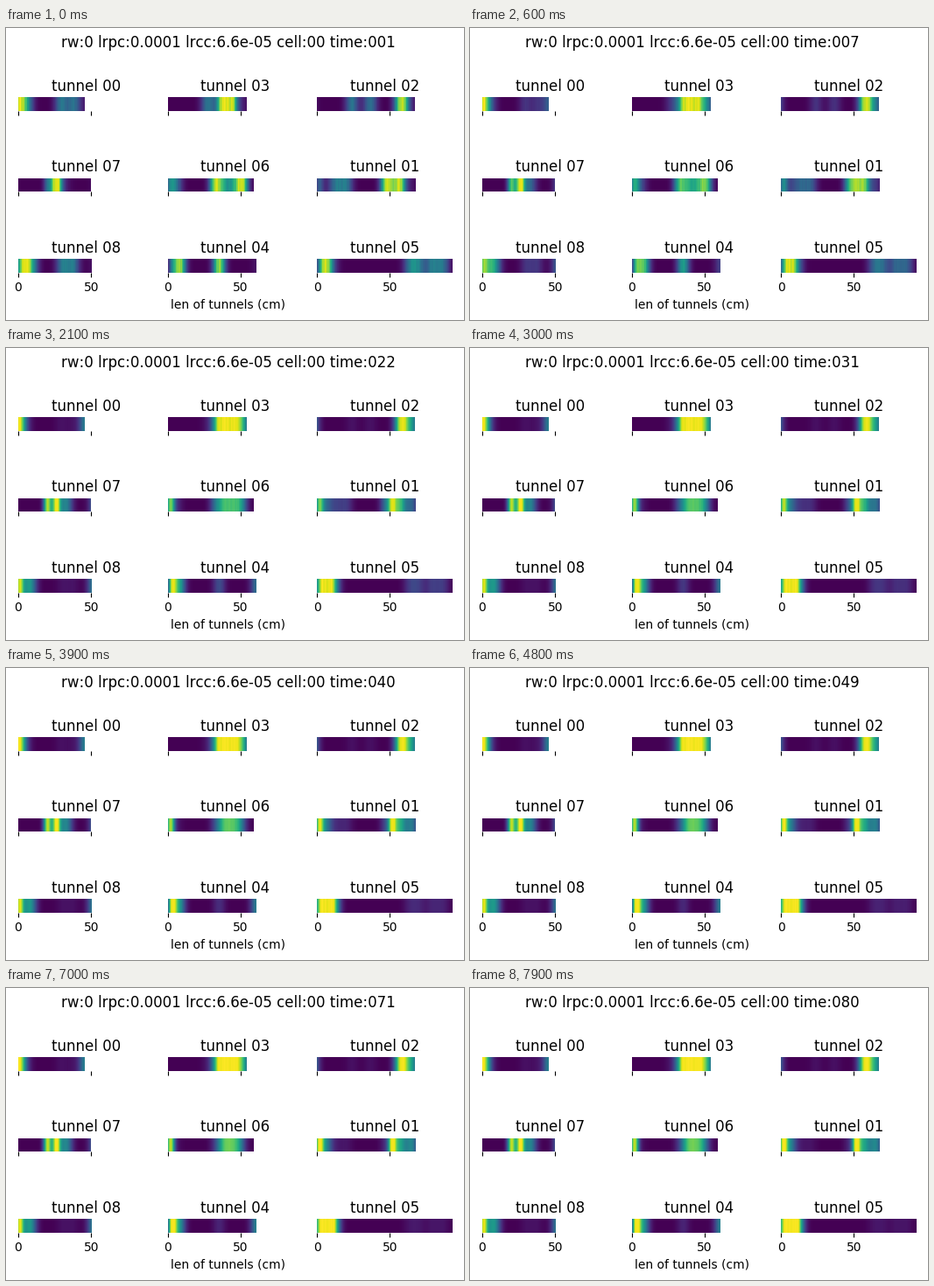
A matplotlib script that plays this animation: 523x334 px, repeating every 8 s.

```python
import numpy as np
import matplotlib.pyplot as plt
from matplotlib.animation import FuncAnimation

W, H, DPI = 523, 334, 100
FRAMES, STEP_MS = 80, 100
LEFT, PITCH_X, AX_W = 14.0, 170.5, 155.0
BOTTOM, PITCH_Y, AX_H = 94.9, 92.4, 15.5
SPAN = 93                  # cm covered by one axes

# How a place field develops: first height, final height, width in cm.
KINDS = {
    "hold": (1.0, 1.0, 3.4),
    "lose": (0.9, 0.1, 3.0),
    "fade": (0.4, 0.04, 3.3),
    "rise": (0.05, 0.45, 3.2),
    "win": (0.3, 0.9, 2.0),
}

plt.rcParams.update({"font.family": "DejaVu Sans", "text.kerning_factor": 6})
fig = plt.figure(figsize=(W / DPI, H / DPI), dpi=DPI, facecolor="white")


class Tunnel:
    """A row of cells whose fields, given by their centers, settle with tau."""

    def __init__(self, name, length, tau=0.5, **fields):
        self.name, self.length, self.tau = name, length, tau
        self.fields = [(c, *KINDS[kind])
                       for kind, centers in fields.items() for c in centers]
        self.x = np.arange(0.25, length, 0.5)
        self.grain = np.random.default_rng(int(name)).random(len(self.x))

    def rates(self, t):
        left = np.exp(-t / self.tau)
        v = sum((end + (start - end) * left)
                * np.exp(-0.5 * ((self.x - c) / width) ** 2)
                for c, start, end, width in self.fields)
        rough = 0.02 + 0.12 * np.exp(-t / 2)
        return (np.minimum(v, 1) * (1 - rough * self.grain))[None, :]


tunnels = [
    Tunnel("00", 45.6, hold=[0.5], fade=[6, 29.5, 38], rise=[46]),
    Tunnel("03", 53.6, hold=[38, 42], fade=[27], rise=[33, 47, 51]),
    Tunnel("02", 67.2, hold=[58], fade=[24, 36.5], rise=[-3, 65]),
    Tunnel("07", 49.4, win=[20, 26], lose=[26], rise=[32.5, 53]),
    Tunnel("06", 58.4, tau=1.5, win=[1.8], lose=[32.5, 50.5],
           fade=[5, 38, 45], rise=[37.5, 42, 47]),
    Tunnel("01", 67.7, tau=2, win=[1.8, 51.5], lose=[47.5, 56.5],
           fade=[13, 20], rise=[6, 56.5, 64.5]),
    Tunnel("08", 50.3, win=[1], lose=[4.8], fade=[9.5, 30.5, 37.5],
           rise=[8, 52]),
    Tunnel("04", 60.3, tau=1.2, win=[3], lose=[8, 35], rise=[7, 61]),
    Tunnel("05", 93.0, tau=2, hold=[6], fade=[64, 70, 79, 86],
           rise=[1, 10, 12]),
]


def label(baseline, text, size):
    return fig.text(254 / W, 1 - baseline / H, text, size=size, ha="center")


def add_strip(i, tunnel):
    row, col = divmod(i, 3)
    x0 = LEFT + col * PITCH_X
    y0 = H - (BOTTOM + row * PITCH_Y)
    ax = fig.add_axes([x0 / W, y0 / H, AX_W / W, AX_H / H])
    image = ax.imshow(tunnel.rates(0), cmap="viridis", vmin=0, vmax=1,
                      aspect="auto", extent=(0, tunnel.length, 0, 1))
    ax.set(xlim=(0, SPAN), ylim=(0, 1), xticks=[0, 50], yticks=[])
    ax.spines[:].set_visible(False)
    ax.patch.set_visible(False)
    ax.tick_params(labelbottom=row == 2, pad=4)
    ax.set_title(f"tunnel {tunnel.name}", fontsize=12, pad=5.3)
    return image


images = [add_strip(i, t) for i, t in enumerate(tunnels)]
heading = label(22, "", 12)
label(321, "len of tunnels (cm)", 10)


def update(i):
    for image, tunnel in zip(images, tunnels):
        image.set_data(tunnel.rates(i * STEP_MS / 1000))
    heading.set_text(f"rw:0 lrpc:0.0001 lrcc:6.6e-05 cell:00 time:{i + 1:03d}")
    return [*images, heading]


anim = FuncAnimation(fig, update, frames=FRAMES, interval=STEP_MS,
                     repeat=True, repeat_delay=0, blit=False)
plt.show()
```
